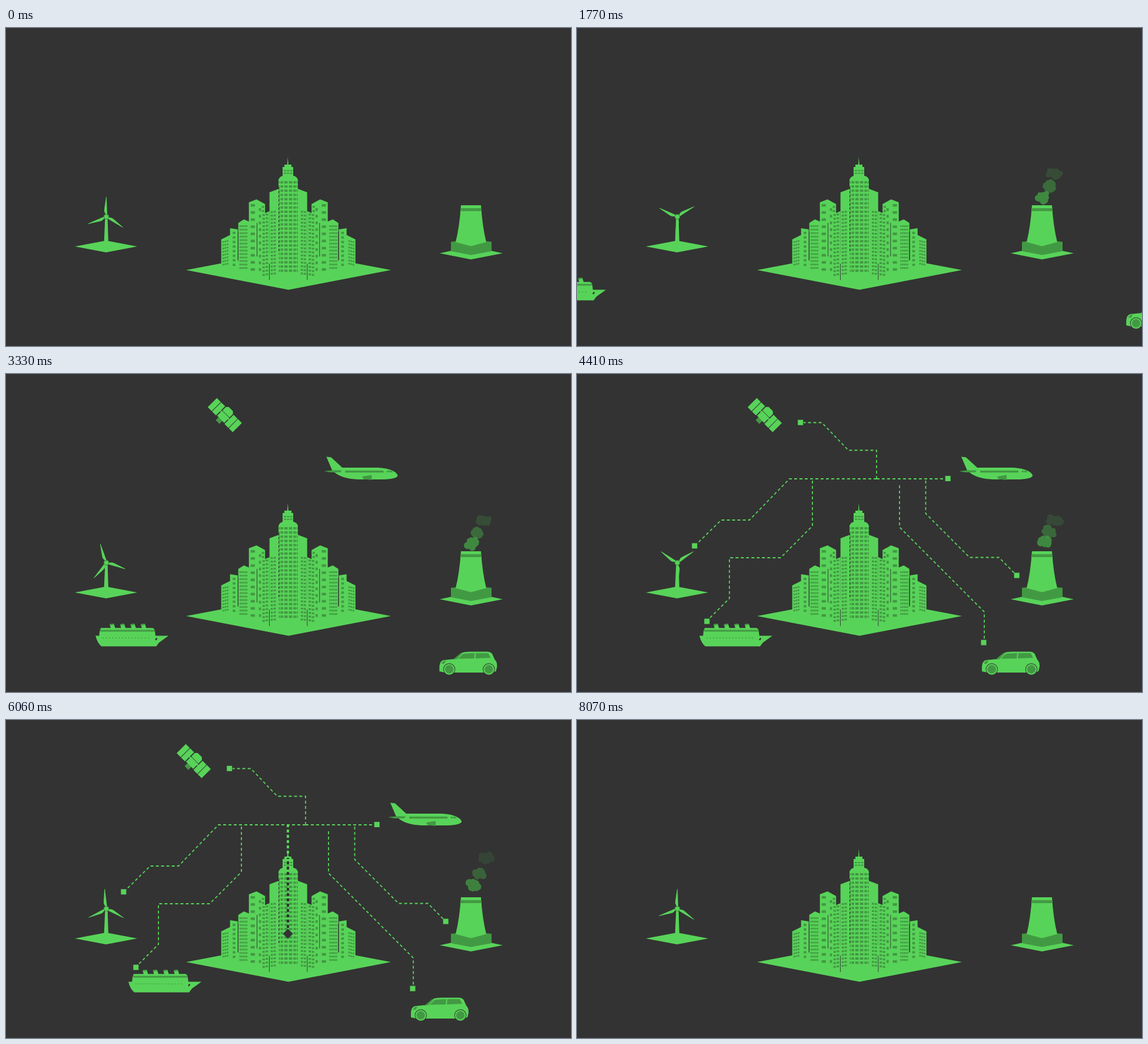
An HTML page with a canvas for the animation above (8250 ms loop, 960 px wide and 540 px high).

```html
<!DOCTYPE html>
<html>
<head>
<meta charset="utf-8">
<title>Connected city</title>
<style>
html, body { margin: 0; width: 960px; height: 540px; overflow: hidden; background: #333; }
canvas { display: block; }
</style>
</head>
<body>
<canvas id="stage" width="960" height="540"></canvas>
<script>
const LOOP = 8250, STEP = 30, REST = 8070;
const BG = '#333', GREEN = '#58d359', DARK = '#429943';
const c = document.getElementById('stage').getContext('2d');

// Smooth progress from 0 to 1 between two times
const ease = (t, from, to) => {
  const u = Math.min(1, Math.max(0, (t - from) / (to - from)));
  return u * u * (3 - 2 * u);
};
const rand = n => { const s = Math.sin(n * 127.1 + 11.7) * 43758.5453; return s - Math.floor(s); };

function fill(d, color = GREEN) {
  c.fillStyle = color;
  c.fill(new Path2D(d));
}
function rect(x, y, w, h, color = GREEN) {
  c.fillStyle = color;
  c.fillRect(x, y, w, h);
}
function disc(x, y, r, color = GREEN) {
  c.fillStyle = color;
  c.beginPath();
  c.arc(x, y, r, 0, 7);
  c.fill();
}
function at(x, y, draw, angle = 0, sx = 1) {
  c.save();
  c.translate(x, y);
  c.rotate(angle);
  c.scale(sx, 1);
  draw();
  c.restore();
}
function windows(x0, x1, cols, y0, y1, rows, slope = 0, tall = 0.5) {
  const w = (x1 - x0) / cols, h = (y1 - y0) / rows;
  c.fillStyle = DARK;
  for (let i = 0; i < cols; i++)
    for (let j = 0; j < rows; j++)
      c.fillRect(x0 + i * w, y0 + j * h + slope * i, w * 0.76, h * tall);
}

// One wing of the skyline; x is measured from the centre axis
function wing() {
  fill('M-114 359L-98 351V410L-114 406Z');
  windows(-112, -101, 3, 362, 406, 8, -0.8);
  fill('M-99 340L-86 342V412H-99Z');
  windows(-94.5, -88.5, 1, 346, 408, 8);
  fill('M-85 331L-75.5 325L-66 329V418H-85Z');
  windows(-83, -69, 5, 335, 412, 13);
  fill('M-67 296L-54 291L-39.5 299V424H-67Z');
  windows(-64, -54.5, 1, 299, 420, 10, 0, 0.36);
  windows(-45, -40, 1, 302, 316, 2);
  windows(-50, -45, 1, 306, 419, 10, 0, 0.42);
  fill('M-46 317L-32 311V428H-46Z');
  windows(-44, -33, 2, 316, 424, 17, -0.9);
  fill('M-32 279L-16 273V430H-32Z');
  windows(-30, -20, 2, 311, 422, 18, -0.5);
  rect(-85.6, 346, 0.9, 49, BG);
  rect(-53.6, 331, 0.9, 57, BG);
  rect(-32.6, 400, 0.9, 28, BG);
}

function city() {
  fill('M306 411L480 378L654 411L480 444.5Z');
  at(479.7, 0, wing);
  at(479.7, 0, wing, 0, -1);
  fill('M463 430V258Q464 253 470 251H489Q495 253 496 258V430Z');
  fill('M470 252V236H473V232H477.8L478.8 219L479.8 232H485V236H488V252Z');
  windows(472, 488, 3, 241, 250, 2);
  // Windows wrapped around the round tower
  for (let j = 0; j < 22; j++)
    for (let a = -1.25; a <= 1.25; a += 0.5) {
      const w = 5.8 * Math.cos(a);
      rect(479.6 + 16 * Math.sin(a) - w / 2, 260 + j * 7.15, w, 4, DARK);
    }
  for (let y = 270; y < 380; y += 7) rect(463, y, 1.2, 4, BG);
}

function turbine(angle) {
  fill('M117 371L170 361L223 371L170 381Z');
  fill('M168.4 323H172.6L174 366H166.5Z');
  for (const blade of [-1, 122, 248])
    at(170.5, 320.5, () => fill('M.2 -34L.9 -33L1.6 -4H-1.2L-3.4 -9L-3.2 -13Z'),
      (angle + blade) * Math.PI / 180);
  disc(170.5, 320.5, 4.6, DARK);
  disc(170.5, 320.5, 3.3);
}

function smoke(t) {
  const gap = 520, life = 1680;
  c.fillStyle = DARK;
  for (let k = Math.ceil((t - life) / gap); k * gap <= t; k++) {
    const age = t - k * gap, u = age / life;
    const x = 788 + age * 0.019, y = 295 - age * (0.033 + 0.011 * rand(k + 40));
    c.globalAlpha = 0.96 * (1 - u);
    c.beginPath();
    for (let i = 0; i < 14; i++) {
      const a = i * 2.4 + u * 2, d = 2 + 7 * rand(k * 13 + i);
      const px = x + Math.cos(a) * d * (1 + 0.5 * u), py = y + Math.sin(a) * d * (1 - 0.3 * u);
      const r = 3.5 + 3 * rand(k * 7 + i + 90);
      c.moveTo(px + r, py);
      c.arc(px, py, r, 0, Math.PI * 2);
    }
    c.fill();
  }
  c.globalAlpha = 1;
}

function chimney() {
  fill('M737 382.5L790 371L844 382.5L790 393Z');
  fill('M756 363L790 360L825 363V379L790 385.5L756 379Z', DARK);
  fill('M773 301H807Q809.5 338 816 363.5L790 370.5L764 363.5Q770.5 338 773 301Z');
  rect(773, 306, 34, 5, DARK);
}

function ship() {
  for (let x = 24; x < 80; x += 17.6)
    at(x, 424, () => {
      fill('M0 1L7 0L9.5 8H2Z');
      fill('M0 1L7 0L7.6 2L.5 3Z', DARK);
    });
  fill('M9 431.3H97Q100 432 101 438L102 446H6L7 437Z');
  rect(8, 434.5, 93, 3, DARK);
  fill('M0 444.5H124L108 456L103 462.5H10Q3 457 0 444.5Z');
  for (let x = 12; x < 94; x += 5.5) rect(x, 447.5, 1.8, 1.5, DARK);
  at(103, 450, () => rect(-1, -2, 2.4, 4, BG), 0.6);
}

function plane() {
  fill('M4 140.5L12 141.5L31 159H92Q108 160 116 164Q125 168 125 173Q123 178 102 179H58Q32 178 19 168L14 164Z');
  fill('M0 165L14 163.6H30L28 167H10Z', DARK);
  rect(36, 164, 65, 3.4, DARK);
  fill('M107 164H110V167H107ZM111 164H114L117 167H111Z', DARK);
  fill('M65 174L81 171.5V180L67 178.5Z', DARK);
}

// Drawn around its centre, panels along the x axis
function satellite() {
  for (const x of [-30, -19.6, 10.2, 20.6]) rect(x, -11, 9.4, 22);
  rect(-10.5, -1, 21, 2);
  rect(-5, 9, 9, 8, DARK);
  rect(-8.5, -2, 17, 12);
  fill('M-8.5 -3V-11L-5 -14.5H5L8.5 -11V-3Z');
  rect(-8.5, -3, 17, 1, DARK);
}

function car() {
  fill('M0 505V496Q1 488 6 486L25 484L38 473.5Q42 471.5 53 471.5H82Q88 472 90 476L94 485Q98 488 98 497L96 505L85 507H10Z');
  fill('M23 485L36 474H39L30 484Z', DARK);
  fill('M32 483.5L40 475.5Q46 474 60 474L59 483Z', DARK);
  fill('M62 474H83L87 482L61 483Z', DARK);
  fill('M3 492L7 487H11L8 492Z', DARK);
  for (const x of [16.7, 84]) {
    disc(x, 501.5, 10.2, BG);
    disc(x, 501.5, 9.3);
    disc(x, 501.5, 7.2, DARK);
  }
}

// Links run from the centre outwards
const links = [
  [[509, 178], [509, 129.5], [461, 129.5], [416, 82.5], [385, 82.5]],
  [[509, 178], [361, 178], [293, 248], [245, 248], [202, 290]],
  [[509, 178], [628, 178]],
  [[400, 181], [400, 258], [346, 312], [259, 312], [259, 381], [222, 418]],
  [[592.5, 181], [592.5, 237], [667, 311.5], [717, 311.5], [746, 341]],
  [[548, 189], [548, 260], [692, 404], [692, 462]]
];
const nodes = [[379.7, 82.3], [199.8, 291.8], [630.2, 177.5], [220.8, 420], [747.2, 342], [691, 456]];

function trace(points, part) {
  const lens = points.slice(1).map((p, i) => Math.hypot(p[0] - points[i][0], p[1] - points[i][1]));
  let left = part * lens.reduce((a, b) => a + b);
  c.beginPath();
  c.moveTo(...points[0]);
  lens.forEach((len, i) => {
    if (left <= 0) return;
    const k = Math.min(1, left / len), [x, y] = points[i], [nx, ny] = points[i + 1];
    c.lineTo(x + (nx - x) * k, y + (ny - y) * k);
    left -= len;
  });
  c.stroke();
}

function network(t) {
  const pulse = (a, b, d, e) => ease(t, a, b) - ease(t, d, e);
  const part = pulse(3420, 4320, 6900, 7800);
  c.setLineDash([5, 4]);
  c.strokeStyle = GREEN;
  c.lineWidth = 1.8;
  if (part > 0) links.forEach(p => trace(p, part));

  const size = 9 * pulse(3840, 4260, 7200, 7650);
  nodes.forEach(([x, y]) => rect(x - size / 2, y - size / 2, size, size));

  const end = 177 + 186 * pulse(4440, 5340, 6765, 7665);
  c.lineWidth = 4;
  if (end > 177) {
    const shade = c.createLinearGradient(0, 234, 0, 234.1);
    shade.addColorStop(0, GREEN);
    shade.addColorStop(1, BG);
    c.strokeStyle = shade;
    trace([[479, 177], [479, end]], 1);
  }
  c.setLineDash([]);
  const gem = 12 * pulse(5100, 5520, 7140, 7620);
  at(479, 363, () => rect(-gem / 2, -gem / 2, gem, gem, BG), Math.PI / 4);
}

function draw(t) {
  rect(0, 0, 960, 540, BG);
  const active = t >= STEP && t < REST;
  const spin = t < 280 ? t * t / 560 : t - 140;
  city();
  turbine(active ? spin * 0.1816 : 0);
  if (active) smoke(t);
  chimney();
  if (!active) return;
  network(t);
  const out = ease(t, 7030, 7950);
  const place = (x, from, start, stop, away) => x + from * (1 - ease(t, start, stop)) + away * out;
  at(place(319, 700, 1550, 3690, -470), 69.8, satellite, Math.PI / 4);
  at(place(649, -785, 2150, 3690, 487), 0, plane);
  at(place(208, -346, 870, 4170, 978), 0, ship);
  at(place(688, 300, 870, 4170, -860), 0, car);
}

function frame() {
  const t = performance.now() % LOOP;
  draw(Math.floor(t / STEP) * STEP);
  requestAnimationFrame(frame);
}
frame();
</script>
</body>
</html>
```
